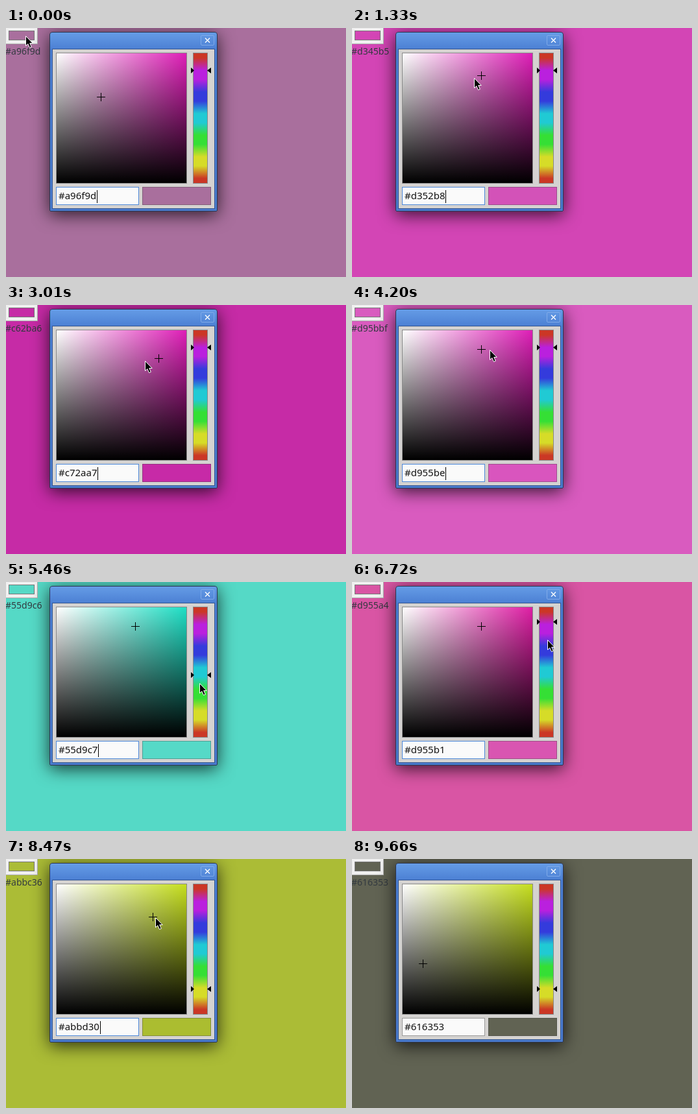
An HTML page for the animation above (9.73 s loop, 524 by 384 pixels).

```html
<!DOCTYPE html>
<html lang="en">
<meta charset="utf-8">
<title>Colour picker</title>
<style>
html, body { margin: 0; width: 100%; height: 100%; overflow: hidden; }
#stage { position: absolute; width: 524px; height: 384px; overflow: hidden; font-family: "Noto Sans", sans-serif; }
#stage * { position: absolute; box-sizing: border-box; white-space: pre; }
#button { left: 0; top: 0; width: 49px; height: 25px; background: #f0f0f0; border: solid #aaa; border-width: 0 1px 1px 0; }
#swatch { left: 4px; top: 4px; width: 40px; height: 15px; border: 1px solid #777; }
#label { left: -1px; top: 26px; font-size: 14px; line-height: 20px; color: #333a40; }
#window { left: 67px; top: 6px; width: 259px; height: 277px; border: 1px solid #2b3550; border-radius: 4px 4px 2px 2px;
  background: linear-gradient(#659ce6, #4b7fd3 26px, #4a7bcd); box-shadow: 0 5px 27px rgba(0, 0, 0, .75); }
#panel { left: 71px; top: 32px; width: 251px; height: 247px; background: #d5d3d1; border: 1px solid #34558f; }
#close { left: 300px; top: 11px; width: 21px; height: 16px; border: 1px solid #80aae8; border-radius: 2px; }
#field, #strip { left: 77px; top: 38px; width: 202px; height: 202px; border: 1px solid #888; }
#strip { left: 288px; width: 23px; }
#input { left: 77px; top: 245px; width: 128px; height: 28px; padding-left: 3px; border: 1px solid; background: #fafafa;
  font-size: 15px; line-height: 25px; color: #111; }
#input span { position: static; }
#caret { display: inline-block; width: 1px; height: 20px; margin-left: 1px; vertical-align: middle; background: #000; }
#preview { left: 210px; top: 245px; width: 106px; height: 28px; border: 1px solid rgba(70, 70, 70, .4); }
#stage svg { left: 0; top: 0; }
</style>
<div id="stage">
  <div id="button"><div id="swatch"></div></div>
  <div id="label"></div>
  <div id="window"></div>
  <div id="panel"></div>
  <div id="close"></div>
  <div id="field"></div>
  <div id="strip"></div>
  <div id="input"><span id="value"></span><span id="caret"></span></div>
  <div id="preview"></div>
  <svg width="524" height="384">
    <path d="M307 15.5l7 7m0-7l-7 7" stroke="#fff" stroke-width="1.4"/>
    <path id="cross" d="M-6 .5H7M.5-6V7" stroke="#000"/>
    <path id="arrows" d="M285-4l5 4.5-5 4.5zM316-4l-6 4.5 6 4.5z"/>
    <path id="mouse" d="M.5 .5V15.5l3.4-3 2.6 6 2.8-1.2-2.6-5.8h4.5z" stroke="#fff"/>
  </svg>
</div>
<script>
const LOOP = 9730, STEP = 70, LEFT = 78, TOP = 39, SIZE = 200;
const el = id => document.getElementById(id);

// Turning points of the pointer: time, x, y
const path = [
  [140, 30, 12], [490, 243, 90], [630, 243, 90],
  // drag on the field
  [910, 252, 78], [1260, 200.3, 73.5], [1750, 120, 130], [2940, 235.8, 82.9], [3150, 150, 95], [4130, 199.7, 68.8],
  // drag on the hue strip
  [4550, 309, 78], [4760, 310, 78], [5040, 302, 146], [5390, 298, 143.5], [5670, 300, 225],
  [6440, 301, 56.4], [6650, 301, 62.2], [6910, 300, 201.3],
  // back on the field, then away
  [7560, 221.5, 193], [7770, 215.7, 178.6], [8000, 185, 105], [8470, 230, 90], [9240, 110.3, 161.4], [9450, 340, 410]
];

// Monotone cubic interpolation, so that rests stay still
const last = path.length - 1;
const slope = (i, k) => (path[i + 1][k] - path[i][k]) / (path[i + 1][0] - path[i][0]);
function tangent(i, k) {
  if (i === 0 || i === last) return 0;
  const a = slope(i - 1, k), b = slope(i, k);
  return a * b > 0 ? 2 * a * b / (a + b) : 0;
}
function pointer(time) {
  const t = Math.min(path[last][0], Math.max(path[0][0], time));
  let i = 0;
  while (i < last - 1 && t >= path[i + 1][0]) i++;
  const d = path[i + 1][0] - path[i][0], u = (t - path[i][0]) / d, v = 1 - u;
  return [1, 2].map(k =>
    v * v * ((1 + 2 * u) * path[i][k] + u * d * tangent(i, k)) +
    u * u * ((1 + 2 * v) * path[i + 1][k] - v * d * tangent(i + 1, k)));
}

const clamp = (v, lo) => Math.min(lo + SIZE, Math.max(lo, v));

// Picked position, from two drags on the field and one on the hue strip
function picked(t) {
  const [x, y] = t < 630 ? [146.64, 106.45] : pointer(Math.min(t, t < 7420 ? 4130 : 9240));
  const hueY = t < 4760 ? 65.467 : pointer(Math.min(t, 6910))[1];
  return { x: clamp(x, LEFT), y: clamp(y, TOP), hueY: clamp(hueY, TOP) };
}

function hsv(h, s, v) {
  return [5, 3, 1].map(n => {
    const k = (n + h / 60) % 6;
    return v * (1 - s * Math.max(0, Math.min(k, 4 - k, 1)));
  });
}
const hueOf = p => 360 * (1 - (p.hueY - TOP) / SIZE);
const hex = p => "#" + hsv(hueOf(p), (p.x - LEFT) / SIZE, 1 - (p.y - TOP) / SIZE)
  .map(c => Math.round(c * 255).toString(16).padStart(2, "0")).join("");

const stripColors = ["#cb3725", "#ba20de", "#343bdc", "#20cad4", "#35df35", "#d6dc28", "#cb3725"];
el("strip").style.background = `linear-gradient(${stripColors.map((c, i) =>
  `${c} ${i / .06 - 3.5}% ${i / .06 + 3.5}%`)})`;

const move = (id, x, y) => el(id).setAttribute("transform", `translate(${x} ${y})`);
const snap = v => Math.floor(v - .4);

function draw() {
  const t = Math.floor(performance.now() % LOOP / STEP) * STEP;
  const now = picked(t - STEP), page = hex(picked(t - 2 * STEP)), color = hex(now);
  el("stage").style.background = el("swatch").style.background = page;
  el("label").textContent = page;
  el("value").textContent = color;
  el("preview").style.background = color;
  const pure = hsv(hueOf(now), 1, 1).map(c => 30 + 192 * c);
  el("field").style.background =
    `linear-gradient(transparent, #000), linear-gradient(90deg, #fff, rgb(${pure}))`;
  el("input").style.borderColor = t < 9660 ? "#4a86d8" : "#999";
  el("caret").style.visibility = t % 1000 < 480 && t < 9450 ? "visible" : "hidden";
  move("cross", snap(now.x), snap(now.y));
  move("arrows", 0, snap(now.hueY));
  move("mouse", ...pointer(t).map(Math.round));
  requestAnimationFrame(draw);
}
draw();
</script>
</html>
```
